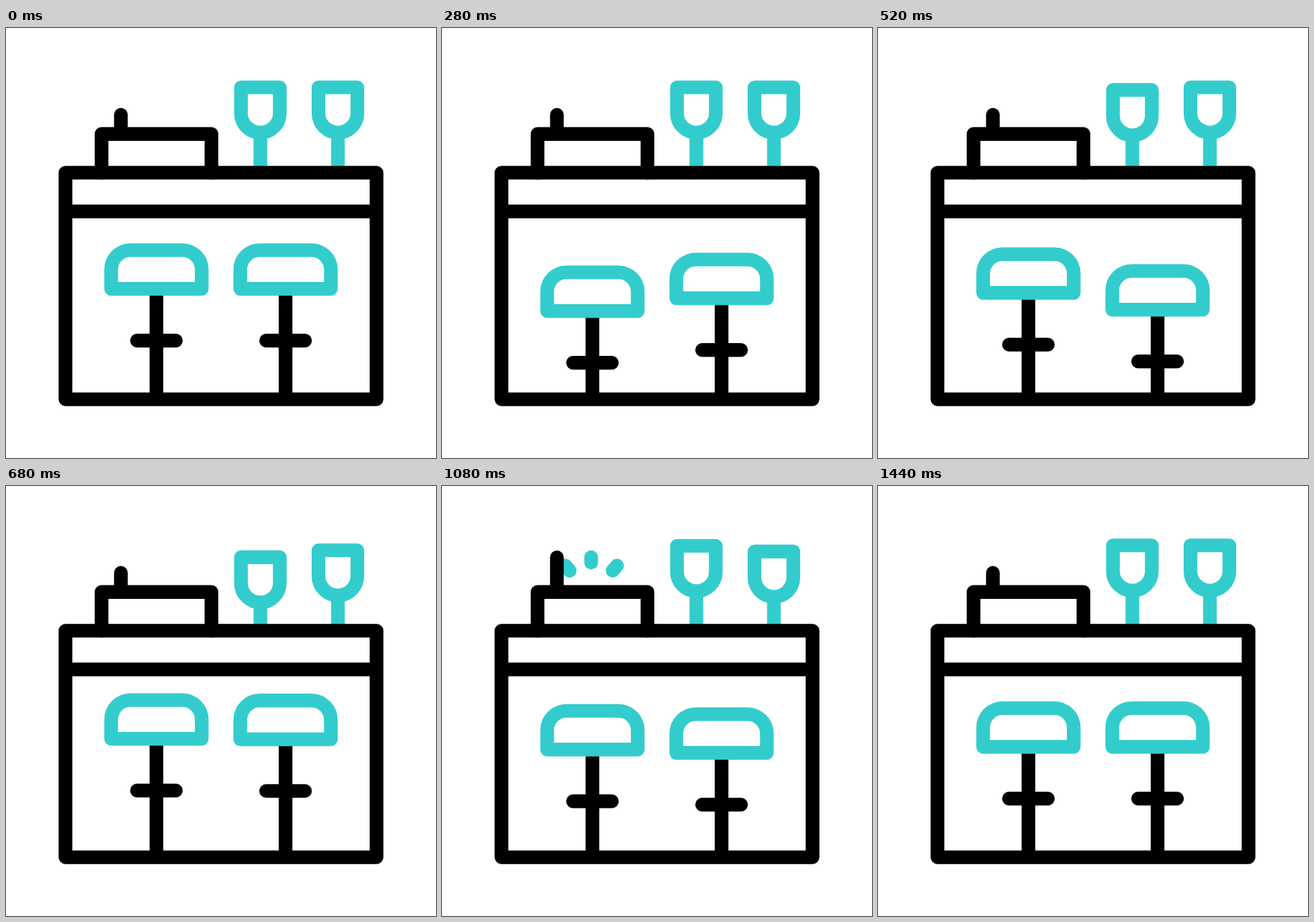
An HTML page with a canvas for the animation above (1840 ms loop, 640x640 px).

```html
<!DOCTYPE html>
<html lang="en">
<head>
<meta charset="utf-8">
<title>Bar counter</title>
<style>
  html, body { margin: 0; width: 100%; height: 100%; overflow: hidden; background: #fff; }
  canvas { display: block; width: 640px; height: 640px; }
</style>
</head>
<body>
<canvas id="stage" width="640" height="640"></canvas>
<script>
const LOOP = 1840, STEP = 40;
const BLACK = '#000', TEAL = '#33cccc';
const ctx = document.getElementById('stage').getContext('2d');
ctx.lineWidth = 20.4;
ctx.lineJoin = 'round';

// Damped bounce of a stool, one key every 80 ms from 40 ms on
const BOUNCE = [0, 1.5, 14, 33, 38.5, 31, 6, -11.3, -12, -4.5, 7, 10.5, 9, 4, 1, 0];

const ease = (t, from, to) => {
  const p = Math.min(1, Math.max(0, (t - from) / (to - from)));
  return p * p * (3 - 2 * p);
};

function bounce(t) {
  if (t <= 80) return 0;
  const pos = (t - 40) / 80, i = Math.floor(pos), u = pos - i;
  const [a, b, c, d] = [-1, 0, 1, 2].map(k => BOUNCE[i + k] || 0);
  return b + u / 2 * (c - a + u * (2 * a - 5 * b + 4 * c - d + u * (3 * (b - c) + d - a)));
}

const dip = t => 20 * (ease(t, 430, 750) - ease(t, 780, 1120));

function stroke(color, path, cap = 'round') {
  ctx.strokeStyle = color;
  ctx.lineCap = cap;
  ctx.stroke(new Path2D(path));
}

function glass(x, dy) {
  const top = 88.4 + dy;
  stroke(TEAL, `M${x} ${top + 67}V215`, 'butt');
  stroke(TEAL, `M${x - 28.9} ${top}h57.8v38.5a28.9 28.9 0 0 1 -57.8 0z`);
}

function stool(x, dy) {
  stroke(BLACK, `M${x} ${388 + dy}V552`, 'butt');
  stroke(BLACK, `M${x - 28.9} ${465.2 + dy}h57.8`);
  stroke(TEAL, `M${x - 67.4} ${388.3 + dy}v-28.8a28.9 28.9 0 0 1 28.9 -28.9
    h77a28.9 28.9 0 0 1 28.9 28.9v28.8z`);
}

function sparks(t) {
  const head = ease(t, 1020, 1200), tail = ease(t, 1200, 1440);
  if (head <= tail) return;
  const ray = (x, y, dx, dy) =>
    stroke(TEAL, `M${x + dx * tail} ${y + dy * tail}L${x + dx * head} ${y + dy * head}`);
  ray(222, 114, 0, -31);
  ray(190, 126, -25, -29);
  ray(254, 126, 25, -29);
}

function draw(t) {
  ctx.fillStyle = '#fff';
  ctx.fillRect(0, 0, 640, 640);
  sparks(t);
  glass(378.6, dip(t));
  glass(494, dip(t - 120));
  const lift = 23 * (ease(t, 920, 1080) - ease(t, 1200, 1440));
  stroke(BLACK, `M171 157.7V${129.2 - lift}`);
  stroke(BLACK, 'M142.2 215.4V157.7H305.8V215.4');
  stool(223.9, bounce(t));
  stool(416.1, bounce(t - 80));
  stroke(BLACK, 'M88.5 215.4H551.5V552.6H88.5ZM88.5 273H551.5');
}

function frame() {
  draw(Math.floor(performance.now() % LOOP / STEP) * STEP);
  requestAnimationFrame(frame);
}
frame();
</script>
</body>
</html>
```
